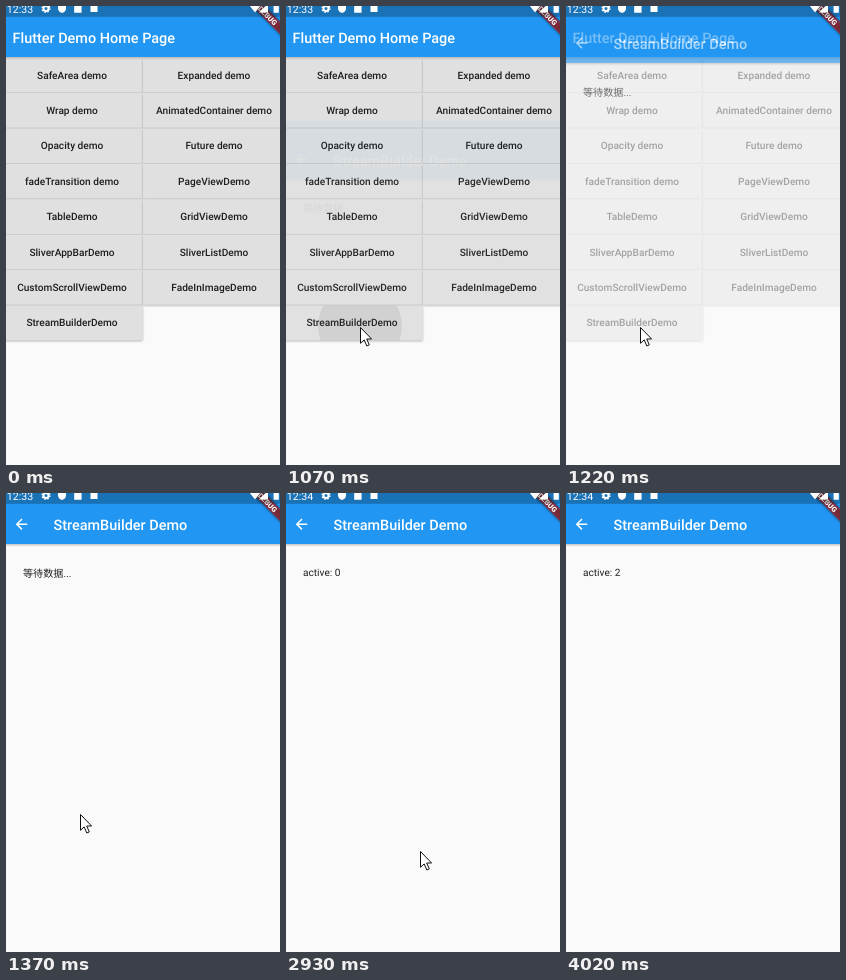
An HTML page for the animation above (4630 ms loop, 274 by 459 pixels).

```html
<!DOCTYPE html>
<html lang="en">
<head>
<meta charset="utf-8">
<title>StreamBuilder Demo</title>
<style>
  html, body { margin: 0; width: 100%; height: 100%; overflow: hidden; background: #fafafa; }
  svg { display: block; width: 100vw; height: 100vh; }
  text { font-family: Roboto, "Noto Sans CJK SC", "Noto Sans CJK", sans-serif; text-rendering: geometricPrecision; }
  .title { font-size: 14.45px; font-weight: 500; fill: #fff; }
  .label { font-size: 10.15px; font-weight: 500; fill: #000; fill-opacity: .87; text-anchor: middle; }
  .body { font-size: 10.15px; fill: #000; fill-opacity: .87; }
  .bar { fill: #2196f3; filter: drop-shadow(0 1px 1.2px rgba(0,0,0,.28)); }
  .btn { fill: #e0e0e0; filter: drop-shadow(0 1px .8px rgba(0,0,0,.27)); }
</style>
</head>
<body>
<svg viewBox="0 0 274 459">
  <defs>
    <clipPath id="press"><rect x="-5" y="299.6" width="142" height="34.7" rx="1.4"/></clipPath>
    <filter id="blur" x="-20%" y="-80%" width="140%" height="260%"><feGaussianBlur stdDeviation="1.5"/></filter>
  </defs>

  <rect width="274" height="459" fill="#fafafa"/>
  <g id="home">
    <g id="buttons"></g>
    <circle id="ripple" cx="74" cy="320" fill="#000" clip-path="url(#press)"/>
    <g id="labels"></g>
    <rect class="bar" x="-5" y="-8" width="284" height="59"/>
    <text class="title" x="6.5" y="37">Flutter Demo Home Page</text>
  </g>

  <g id="page">
    <rect x="-5" y="-8" width="284" height="533" fill="#fafafa"/>
    <text class="body" id="status" x="17" y="82.6"></text>
    <rect class="bar" x="-5" y="-8" width="284" height="59"/>
    <path d="M21.2 31.2H11M16 26l-5.2 5.2 5.2 5.2" fill="none" stroke="#fff" stroke-width="1.5"/>
    <text class="title" x="47.5" y="37">StreamBuilder Demo</text>
  </g>

  <g transform="translate(279 -7.7) rotate(45)">
    <rect x="-29" y="20.2" width="58" height="8.7" fill-opacity=".6" filter="url(#blur)"/>
    <rect x="-29" y="20.2" width="58" height="8.7" fill="#b71c1c" fill-opacity=".627"/>
    <text y="27.2" text-anchor="middle" font-size="7.37" font-weight="900" fill="#fff">DEBUG</text>
  </g>

  <rect width="274" height="10.8" fill-opacity=".25"/>
  <g fill="#fff">
    <text id="clock" x="0.8" y="6.8" font-size="10.6"></text>
    <circle cx="40" cy="2.4" r="2.5" fill="none" stroke="#fff" stroke-width="2"/>
    <circle cx="40" cy="2.4" r="3.9" fill="none" stroke="#fff" stroke-width="1.4" stroke-dasharray="1.6 1.46"/>
    <path d="M52 -1l4-1.6 4 1.6v3.2q0 3.4-4 4.8-4-1.4-4-4.8z"/>
    <path d="M68.2 0l2.4-2.4h5v9.2h-7.4z"/>
    <rect x="84.5" y="-1" width="7" height="7"/>
    <path d="M243 -1h12l-6 7.4z"/>
    <path d="M253 6.6l9-9v9z"/>
    <rect x="267.6" y="-3" width="5.2" height="9.8" rx=".6"/>
  </g>

  <path id="cursor" d="M.5 .5V16.3L4.2 12.9 6.8 19 9.3 17.9 6.7 12H11.6Z" fill="#fff" stroke="#111" stroke-width="1"/>
</svg>
<script>
const LOOP = 4630;
const $ = id => document.getElementById(id);
const mix = (a, b, p) => a + (b - a) * p;

function add(parent, name, attrs, content = "") {
  const el = document.createElementNS("http://www.w3.org/2000/svg", name);
  for (const key in attrs) el.setAttribute(key, attrs[key]);
  el.textContent = content;
  $(parent).append(el);
}

["SafeArea demo", "Expanded demo", "Wrap demo", "AnimatedContainer demo",
 "Opacity demo", "Future demo", "fadeTransition demo", "PageViewDemo",
 "TableDemo", "GridViewDemo", "SliverAppBarDemo", "SliverListDemo",
 "CustomScrollViewDemo", "FadeInImageDemo", "StreamBuilderDemo"
].forEach((name, i) => {
  const x = i % 2 * 142 - 5, y = 51.7 + Math.floor(i / 2) * 35.4;
  add("buttons", "rect", { class: "btn", x, y, width: 141.7, height: 34.7, rx: 1.4 });
  add("labels", "text", { class: "label", x: x + 71, y: y + 20.9 }, name);
});

// Cubic bezier easing, solved by bisection
function bezier(x1, y1, x2, y2) {
  const at = (a, b, s) => 3 * a * s * (1 - s) ** 2 + 3 * b * s * s * (1 - s) + s ** 3;
  return x => {
    let lo = 0, hi = 1;
    for (let i = 0; i < 24; i++) {
      const s = (lo + hi) / 2;
      if (at(x1, x2, s) < x) lo = s; else hi = s;
    }
    return at(y1, y2, lo);
  };
}
const slide = bezier(.4, 0, .2, 1), fade = bezier(.42, 0, 1, 1);

// Pointer moves: start, step length, tip positions
const moves = [
  [70, 76.7, [[164, 417], [128, 386], [100, 358], [82, 339], [77, 329], [75, 323], [74, 321]]],
  [1376, 76.7, [[76, 323], [78, 325]]],
  [2550, 76.7, [[80, 326], [88, 331], [98, 337], [110, 344], [122, 351], [134, 358], [141, 363]]],
  [3090, 78.4, [[150, 371], [163, 384], [178, 400], [194, 419], [208, 436], [222, 449], null]]
];

function pointer(t) {
  const move = moves.filter(m => t >= m[0]).pop();
  if (!move) return null;
  const [start, step, tips] = move;
  return tips[Math.min(tips.length - 1, Math.floor((t - start + 5) / step))];
}

const snap = (t, start) => start + Math.floor((t - start + 5) / 76.7) * 76.7;

function rippleAt(t) {
  if (t < 680 || t >= 1220) return [0, 0];
  if (t < 990) return [t < 760 ? 7 : 15, .07];
  const s = snap(t, 990);
  return [mix(32, 42, (s - 990) / 76.7), s > 1100 ? .035 : .07];
}

function draw(t) {
  const [r, alpha] = rippleAt(t);
  $("ripple").setAttribute("r", r);
  $("ripple").setAttribute("fill-opacity", alpha);

  const p = t < 990 ? 0 : Math.min(1, Math.max(0, (snap(t, 990) - 1024) / 265));
  $("page").setAttribute("opacity", p < 1 ? fade(p) : 1);
  $("page").setAttribute("transform", `translate(0 ${p < 1 ? mix(133, 0, slide(p)) : 0})`);
  $("page").style.display = p ? "" : "none";

  $("status").textContent = t < 2090 ? "等待数据..." : "active: " + (t < 3010 ? 0 : t < 4020 ? 1 : 2);
  $("status").setAttribute("y", t < 2090 ? 83.8 : 82.6);
  $("clock").textContent = t < 1376 ? "12:33" : "12:34";

  const tip = pointer(t);
  $("cursor").style.display = tip ? "" : "none";
  if (tip) $("cursor").setAttribute("transform", `translate(${tip})`);
}

const begin = performance.now();
function tick() {
  draw((performance.now() - begin) % LOOP);
  requestAnimationFrame(tick);
}
tick();
</script>
</body>
</html>
```
